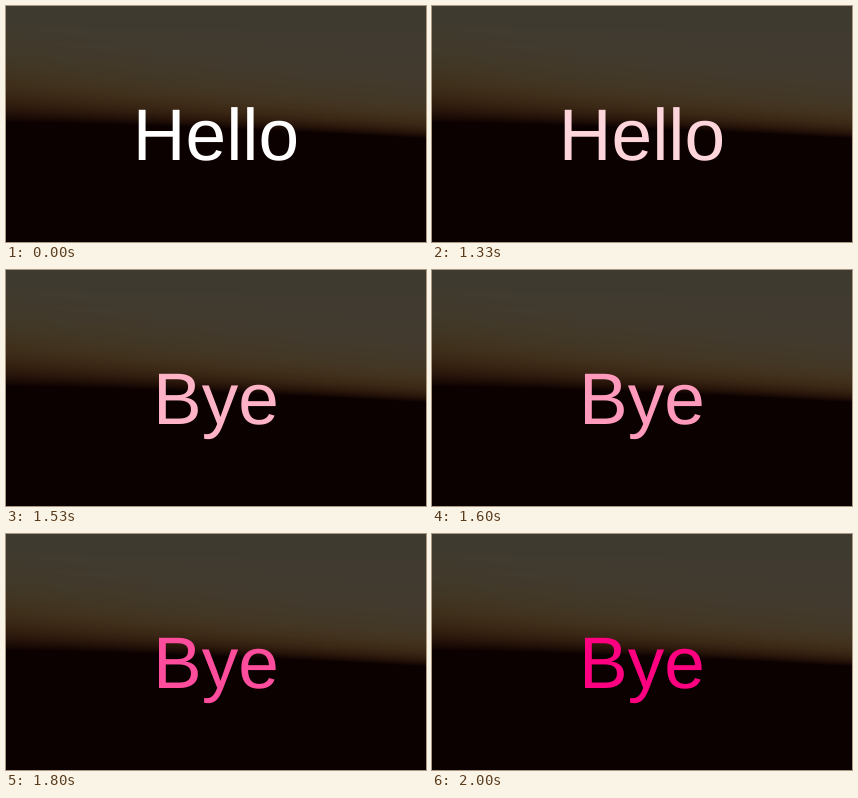
An HTML page with a canvas that plays this animation: 420 by 236 pixels, repeating every 2990 ms.

```html
<!DOCTYPE html>
<html lang="en">
<head>
<meta charset="utf-8">
<title>Hello and Bye</title>
<style>
  html, body { margin: 0; width: 100%; height: 100%; overflow: hidden; background: #0b0000; }
  canvas, svg { position: absolute; left: 0; top: 0; }
  text {
    font: 73px "Liberation Sans", Arial, sans-serif;
    text-anchor: middle;
    text-rendering: geometricPrecision;
  }
</style>
</head>
<body>
<canvas id="dusk" width="420" height="236"></canvas>
<svg width="420" height="236"><text id="word" x="210" y="154">Hello</text></svg>
<script>
const W = 420, H = 236, LOOP = 2990, FPS = 15;
const WHITE = [255, 255, 255], PINK = [255, 192, 203], ROSE = [255, 0, 128];
const word = document.getElementById("word");
const mix = (a, b, p) => `rgb(${a.map((v, i) => Math.round(v + (b[i] - v) * p))})`;

// Dusk sky: blue fades first towards the sloping horizon, then green, then red
function paintDusk() {
  const ctx = document.getElementById("dusk").getContext("2d");
  for (let x = 0; x < W; x++) {
    const u = x / W, horizon = 116 + 16 * u ** 1.5, sharp = 1 + 1.5 * u;
    for (let y = 0; y < H; y++) {
      const v = Math.min(1, y / horizon);
      const fade = k => 1 - v ** (k * sharp);
      ctx.fillStyle = `rgb(${12 + (50 + 8 * v) * fade(6)},${1 + 57 * fade(4)},${1 + 47 * fade(2)})`;
      ctx.fillRect(x, y, 1, 1);
    }
  }
}

function draw(now) {
  const step = Math.floor((now % LOOP + 4) * FPS / 1000);
  const p = Math.min(1, Math.max(0, step / FPS - 1));
  const early = p < 0.5;
  word.textContent = early ? "Hello" : "Bye";
  word.setAttribute("fill", early ? mix(WHITE, PINK, 2 * p) : mix(PINK, ROSE, 2 * p - 1));
}

const start = performance.now();
function tick() {
  draw(performance.now() - start);
  requestAnimationFrame(tick);
}
paintDusk();
tick();
</script>
</body>
</html>
```
